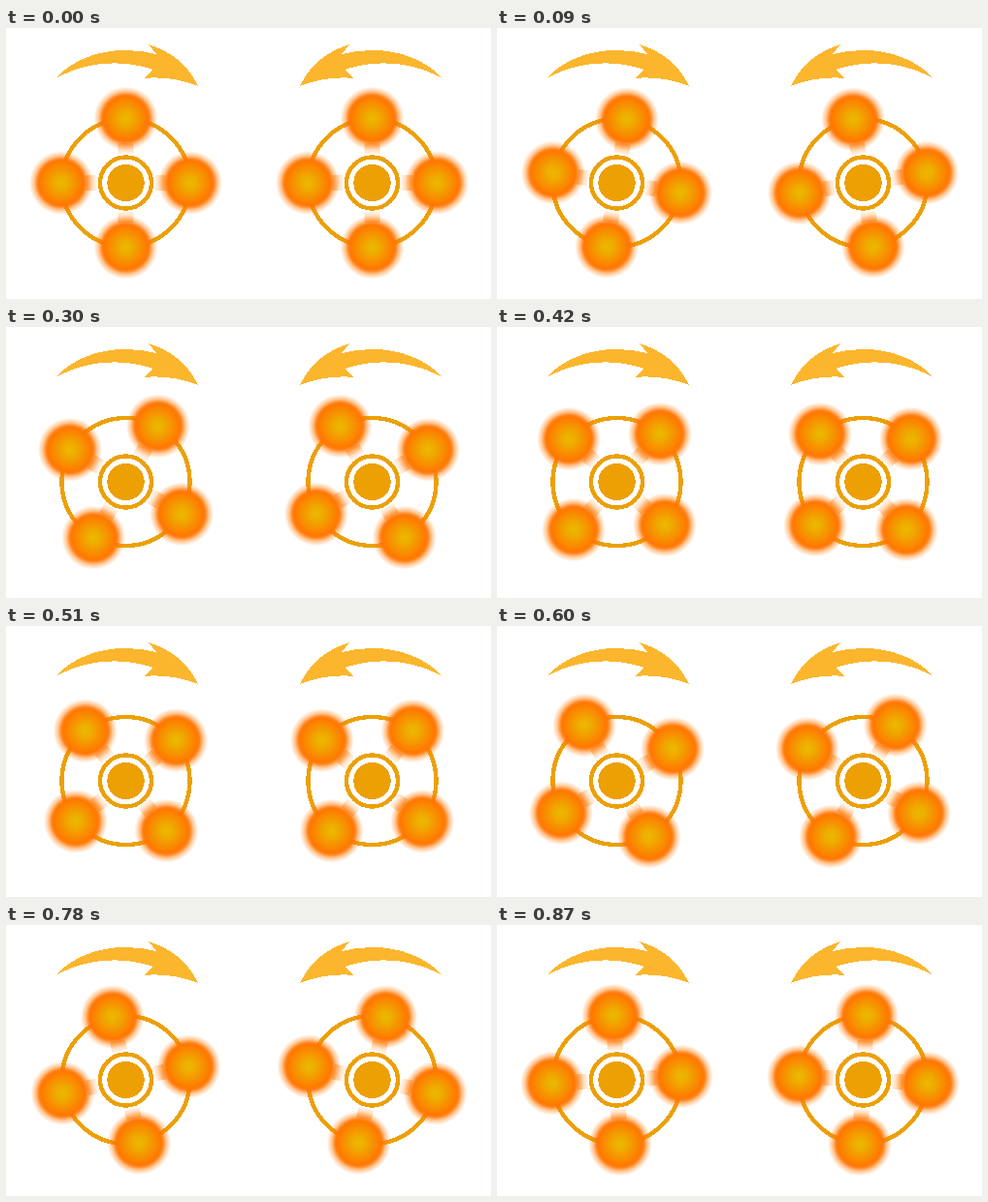
An HTML page that plays this animation: 500x280 px, repeating every 900 ms.

```html
<!DOCTYPE html>
<html lang="en">
<head>
<meta charset="utf-8">
<title>Counter-rotating rings</title>
<style>
  html, body { margin: 0; width: 100%; height: 100%; overflow: hidden; background: #fff; }
  svg { display: block; }
</style>
</head>
<body>
<svg width="500" height="280" viewBox="0 0 500 280">
  <defs>
    <radialGradient id="glow">
      <stop offset="0" stop-color="#ebb900"/>
      <stop offset=".2" stop-color="#eeac00"/>
      <stop offset=".68" stop-color="#ff7800"/>
      <stop offset=".74" stop-color="#ff7400" stop-opacity=".9"/>
      <stop offset=".85" stop-color="#ff7800" stop-opacity=".42"/>
      <stop offset="1" stop-color="#ff8000" stop-opacity="0"/>
    </radialGradient>
    <linearGradient id="haze" x2="0" y2="1">
      <stop offset="0" stop-color="#ff7800" stop-opacity=".5"/>
      <stop offset="1" stop-color="#ff7800" stop-opacity=".08"/>
    </linearGradient>
    <g id="ball">
      <rect x="-8" y="-41" width="16" height="11" fill="url(#haze)"/>
      <circle cy="-66.5" r="33" fill="url(#glow)"/>
    </g>
  </defs>
  <g id="wheel">
    <path fill="#fbb62d" shape-rendering="crispEdges"
      d="M51 52C75 26 115 17 155 27L147 17C172 25 187 38 198 60C180 53 162 50 142 52L152 43C122 33 85 33 51 52Z"/>
    <g transform="translate(123.5 160)">
      <g fill="none" stroke="#eca004" stroke-width="4.4" shape-rendering="crispEdges">
        <circle r="66"/>
        <circle r="26.5"/>
      </g>
      <circle r="19.2" fill="#eca004" shape-rendering="crispEdges"/>
      <g id="balls">
        <use href="#ball"/>
        <use href="#ball" transform="rotate(90)"/>
        <use href="#ball" transform="rotate(180)"/>
        <use href="#ball" transform="rotate(270)"/>
      </g>
    </g>
  </g>
  <use href="#wheel" transform="translate(501 0) scale(-1 1)"/>
</svg>
<script>
  const LOOP = 900, STEP = 30, DEGREES_PER_STEP = 3;
  const balls = document.getElementById('balls');

  function draw() {
    const step = Math.floor(performance.now() % LOOP / STEP);
    balls.setAttribute('transform', `rotate(${step * DEGREES_PER_STEP})`);
    requestAnimationFrame(draw);
  }
  draw();
</script>
</body>
</html>
```
